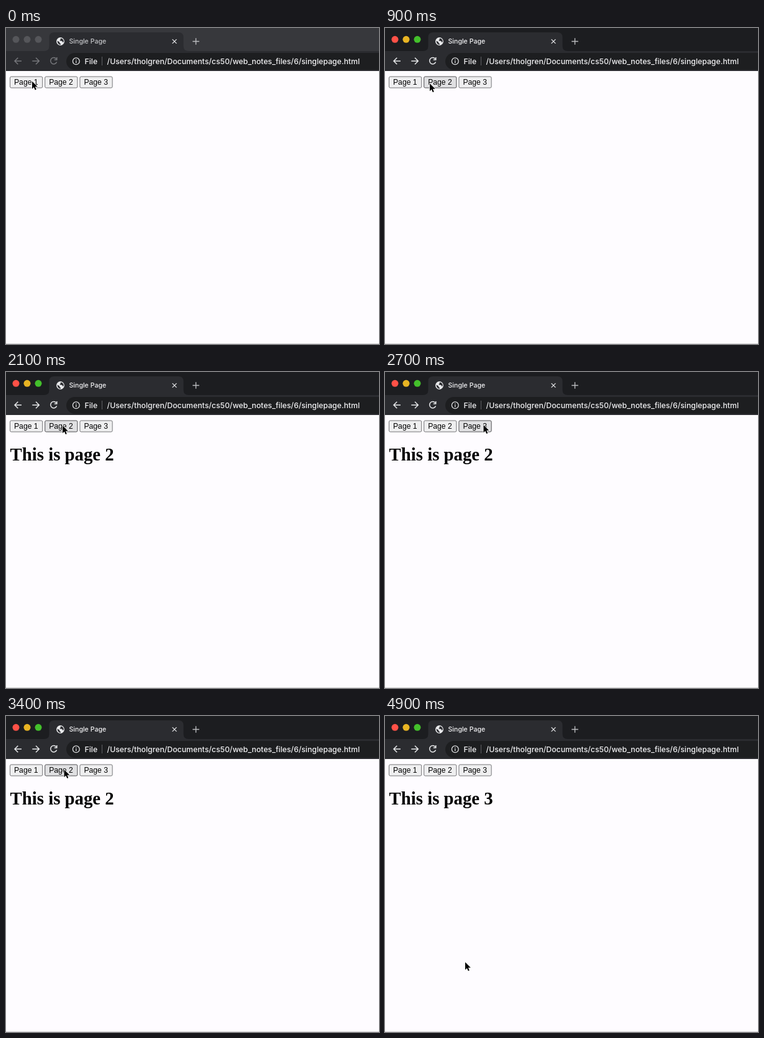
An HTML page that plays this animation: 600 px wide and 507 px high, repeating every 5100 ms.

```html
<!DOCTYPE html>
<html lang="en">
<head>
<meta charset="utf-8">
<title>Single Page</title>
<style>
  html, body { margin: 0; width: 100%; height: 100%; overflow: hidden; background: #fefcff; }
  svg { display: block; width: 600px; height: 507px; }
  text { white-space: pre; }
  .ui { font-family: Inter, Roboto, sans-serif; font-weight: 500; font-size: 12.29px; fill: #f1f1f3; }
  .strip { fill: #1c1d20; }
  .bar { fill: #2b2c30; }
  .field { fill: #1d1e20; }
  .title { font-size: 10.6px; }
  .nav, .tool { fill: none; stroke: #e6e7e9; stroke-width: 1.5; }
  .tool { stroke: #dfe0e2; stroke-width: 1.3; }
  .plus { stroke: #b9babd; stroke-width: 1.4; }
  .idle .strip { fill: #37383c; }
  .idle .light { fill: #55565a; }
  .idle .nav { stroke: #76777b; }
  .idle .title { fill: #c3c4c7; }
  .button rect { fill: #efeff0; stroke: #747477; }
  .button text { font: 12.2px "Liberation Sans", Arial, sans-serif; text-anchor: middle; }
  .hover rect { fill: #e0e0e2; stroke: #4e4e51; }
  #heading { font: bold 28.8px "Liberation Serif", "Times New Roman", serif; }
</style>
</head>
<body>
<svg id="stage" viewBox="0 0 600 507">
  <rect width="600" height="507" fill="#fefcff"/>
  <rect class="strip" width="600" height="38"/>
  <rect class="bar" y="37" width="600" height="32"/>
  <path class="bar" d="M61 37q8.500 0 8.500-8V15q0-8 8-8h200q8 0 8 8v14q0 8 8.500 8v1H61z"/>
  <rect class="field" x="97" y="40" width="540" height="27" rx="13.500"/>
  <g id="lights"></g>

  <circle cx="87.500" cy="21.500" r="6.400" fill="#e9eaec"/>
  <path class="bar" d="M82.500 20.500l3.500 2 .4 1.800 1.700 1.200-.6 1.500q-4.500-.7-5-6.500zM87.400 16.700h2.200q3.200 1.500 3.200 5l-1.200 1.500-1.300-2.200-3.200-.4-.7-1.400 1.600-.8z"/>
  <text class="ui title" x="101.500" y="25.400">Single Page</text>
  <path class="tool" d="M267.600 18.100l6.800 6.800m0-6.800l-6.800 6.800"/>
  <path class="plus" d="M300.200 21.500h10.600m-5.300-5.300v10.600"/>

  <path class="nav" d="M25 53H14m5.300-5.300L14 53l5.300 5.300"/>
  <path class="nav" d="M42.300 53h11M48 47.700l5.300 5.300-5.300 5.300"/>
  <path class="nav" d="M80.800 49.500a5.100 5.100 0 1 0 .8 5M81.800 47v4h-4"/>

  <circle class="tool" cx="112.800" cy="53.300" r="5.400"/>
  <path class="tool" d="M112.800 52.600v3.600m0-5.900v1.200"/>
  <text class="ui" x="126.500" y="57.500">File</text>
  <path d="M154.500 46v14" stroke="#5e5f63"/>
  <text class="ui" x="162.600" y="57.500">/Users/tholgren/Documents/cs50/web_notes_files/6/singlepage.html</text>

  <g id="buttons"></g>
  <text id="heading" x="6.500" y="142"></text>
  <path d="M0 506.500h600" stroke="#d3d1d5"/>
  <path id="cursor" d="M0 0v12.200l2.800-2.600 2 4.500 2-.9-1.900-4.400h3.900z"
        stroke="#fff" stroke-width="1.600" paint-order="stroke" stroke-linejoin="round"/>
</svg>
<script>
  const LOOP = 5100, STEP = 100, FOCUS = 500, WAKE = 700;
  const BUTTON = { x: 6.5, y: 78, w: 52.2, h: 18, pitch: 56.2 };
  const $ = id => document.getElementById(id);

  // Pointer moves: begin, end, and the point reached
  const home = { x: 42, y: 85.5 };
  const moves = [
    { from: 0, to: 200, x: 44.5, y: 85 },
    { from: 600, to: 900, x: 72, y: 89 },
    { from: 900, to: 1100, x: 38, y: 85 },
    { from: 1400, to: 1800, x: 91, y: 86 },
    { from: 2300, to: 2700, x: 158.5, y: 85 },
    { from: 2800, to: 3300, x: 93.5, y: 86 },
    { from: 3400, to: 3900, x: 134, y: 82 },
    { from: 4100, to: 4500, x: 112, y: 447 },
    { from: 4500, to: 4900, x: 129, y: 395 }
  ];
  const clicks = [1300, 2100, 2800, 3300, 3900];

  const clamp = v => Math.min(1, Math.max(0, v));
  const ease = v => v * v * (3 - 2 * v);

  function pointer(t) {
    let { x, y } = home;
    for (const m of moves) {
      const k = ease(clamp((t - m.from) / (m.to - m.from)));
      x += (m.x - x) * k;
      y += (m.y - y) * k;
    }
    return { x, y };
  }

  // Number of the button under a point, 0 for none
  function hit({ x, y }) {
    const dx = x - BUTTON.x, i = Math.floor(dx / BUTTON.pitch);
    const inside = y >= BUTTON.y && y <= BUTTON.y + BUTTON.h
      && i >= 0 && i < 3 && dx - i * BUTTON.pitch <= BUTTON.w;
    return inside ? i + 1 : 0;
  }

  function pageAt(t) {
    const click = clicks.findLast(c => c <= t);
    return click ? hit(pointer(click)) : 0;
  }

  function add(parent, tag, attrs) {
    const node = document.createElementNS('http://www.w3.org/2000/svg', tag);
    for (const key in attrs) node.setAttribute(key, attrs[key]);
    return parent.appendChild(node);
  }

  ['#ff5147', '#e8b423', '#43c02b'].forEach((fill, i) =>
    add($('lights'), 'circle', { class: 'light', cx: 16 + 18 * i, cy: 18.3, r: 5.5, fill }));

  const buttons = [1, 2, 3].map(n => {
    const x = BUTTON.x + (n - 1) * BUTTON.pitch;
    const g = add($('buttons'), 'g', { class: 'button' });
    add(g, 'rect', { x, y: BUTTON.y, width: BUTTON.w, height: BUTTON.h, rx: 2 });
    add(g, 'text', { x: x + BUTTON.w / 2 - 0.3, y: 91 }).textContent = `Page ${n}`;
    return g;
  });

  function draw(t) {
    const p = pointer(t), page = pageAt(t);
    const over = t >= WAKE ? hit(p) : 0;
    $('stage').classList.toggle('idle', t < FOCUS);
    $('cursor').setAttribute('transform', `translate(${p.x} ${p.y})`);
    $('heading').textContent = page ? `This is page ${page}` : '';
    buttons.forEach((g, i) => g.classList.toggle('hover', over === i + 1));
  }

  const start = performance.now();
  function tick() {
    const t = (performance.now() - start) % LOOP;
    draw(Math.floor(t / STEP) * STEP);
    requestAnimationFrame(tick);
  }
  tick();
</script>
</body>
</html>
```
